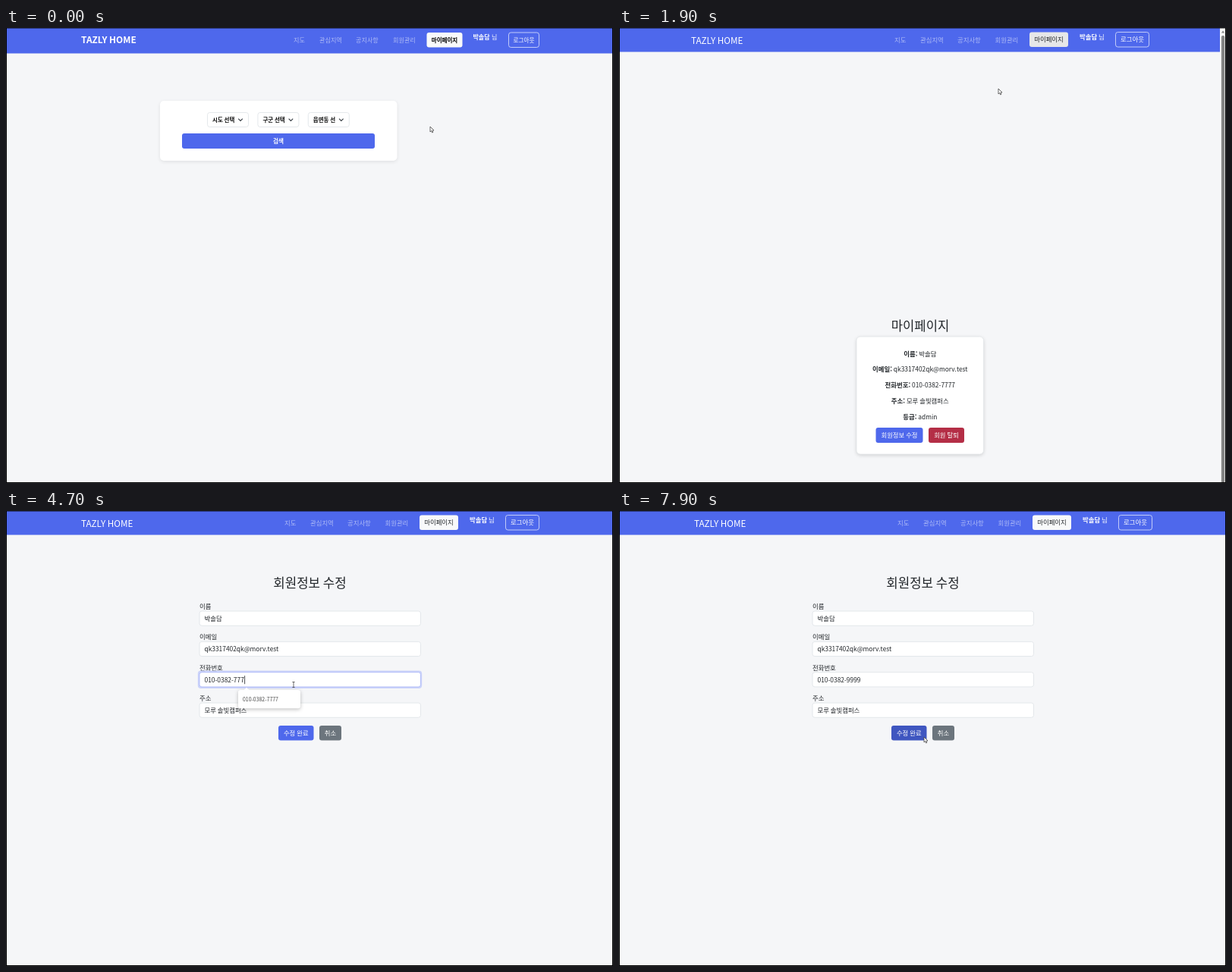
Animation of 800 by 600 pixels, one loop 8 s. Source, as an HTML page with a canvas:

```html
<!DOCTYPE html>
<html lang="ko">
<head>
<meta charset="utf-8">
<style>
  html, body { margin: 0; width: 100%; height: 100%; overflow: hidden; background: #f5f6f8; }
  canvas { display: block; }
</style>
</head>
<body>
<canvas id="stage" width="800" height="600"></canvas>
<script>
const c = document.getElementById('stage').getContext('2d');
const LOOP = 8000;
const FONT = '"Noto Sans CJK KR", "Noto Sans CJK", "Noto Sans", sans-serif';
const BLUE = '#4e68ec', BLUE_HOVER = '#3f56c0', INK = '#212529', PAGE = '#f5f6f8';
const MENU = ['지도', '관심지역', '공지사항', '회원관리'];
const BRAND = 'TAZLY HOME', USER = '박솔담', MAIL = 'qk3317402qk@morv.test';
const AREA = '010-0382-', PHONE = AREA + '7777', PLACE = '모루 솔빛캠퍼스';

// Cursor stops: time, x, y
const PATH = [
  [100, 559, 130], [1200, 573, 19], [1700, 573, 19], [1900, 500, 80],
  [3200, 391, 533], [3400, 391, 533], [4300, 379, 229], [6100, 379, 229],
  [6200, 382, 231], [6900, 402, 298]
];
// Last part of the phone number as it is edited
const KEYS = [
  [4400, '7777'], [4600, '777'], [4900, '77'], [5100, '7'], [5400, ''],
  [6100, '9'], [6400, '99'], [6600, '999'], [6800, '9999']
];

const ramp = (t, a, b) => Math.min(1, Math.max(0, (t - a) / (b - a)));
const ease = p => p * p * (3 - 2 * p);
const mix = (a, b, p) => `rgb(${a.map((v, i) => Math.round(v + (b[i] - v) * p))})`;
const blueMix = p => mix([78, 104, 236], [63, 86, 192], p);

function text(s, x, y, { size = 8.4, weight = 400, color = INK, align = 'left' } = {}) {
  c.font = `${weight} ${size}px ${FONT}`;
  c.fillStyle = color;
  c.textAlign = align;
  c.fillText(s, x, y + size * 0.37);
  return c.measureText(s).width;
}

function box(x, y, w, h, r, fill, stroke, shadow) {
  c.save();
  c.beginPath();
  c.roundRect(x, y, w, h, r);
  if (shadow) {
    c.shadowColor = `rgba(0,0,0,${shadow})`;
    c.shadowBlur = 5;
    c.shadowOffsetY = 1.5;
  }
  if (fill) { c.fillStyle = fill; c.fill(); }
  c.shadowColor = 'transparent';
  if (stroke) { c.strokeStyle = stroke; c.lineWidth = 0.8; c.stroke(); }
  c.restore();
}

function button(label, x, y, w, h, fill, style = {}, stroke) {
  box(x, y, w, h, 3, fill, stroke);
  text(label, x + w / 2, y + h / 2, { color: '#fff', align: 'center', ...style });
}

function poly(points, fill, stroke) {
  c.beginPath();
  points.forEach(([x, y]) => c.lineTo(x, y));
  c.closePath();
  c.fillStyle = fill;
  c.fill();
  if (stroke) { c.strokeStyle = stroke; c.lineWidth = 0.8; c.stroke(); }
}

function header(dx, width, hover) {
  c.fillStyle = BLUE;
  c.fillRect(0, 0, width, 31.5);
  text(BRAND, 95 + dx, 16.5, { size: 11.7, color: '#fff' });
  MENU.forEach((s, i) => text(s, [363, 397, 446, 495.5][i] + dx, 16, { color: 'rgba(255,255,255,.55)' }));
  button('마이페이지', 541 + dx, 5.5, 51, 19.5, mix([248, 249, 250], [211, 212, 213], hover), { color: INK });
  text(USER, 607 + dx, 12, { weight: 700, color: '#fff' });
  text('님', 632 + dx, 12, { color: '#fff' });
  button('로그아웃', 654.5 + dx, 5.5, 44, 19.5, null, {}, '#dfe4fc');
}

function searchPage(t) {
  const black = { size: 7.5, weight: 900 };
  c.fillStyle = BLUE;
  c.fillRect(0, 0, 800, 33.5);
  text(BRAND, 99, 16, { size: 11.9, weight: 700, color: '#fff' });
  MENU.forEach((s, i) => text(s, [379, 413, 461, 510][i], 16.5, { size: 8.1, weight: 500, color: 'rgba(255,255,255,.55)' }));
  button('마이페이지', 554.5, 6, 47, 19.5, mix([248, 249, 250], [211, 212, 213], ramp(t, 1000, 1150)), { ...black, color: '#000' });
  text(USER, 615.5, 12.5, { size: 8, weight: 900, color: '#fff' });
  text('님', 640, 12.5, { size: 8, color: '#fff' });
  button('로그아웃', 662.5, 6, 40, 19.5, null, { size: 7.6, weight: 500 }, '#dfe4fc');

  box(203, 96, 312.5, 79, 5, '#fff', null, 0.09);
  ['시도 선택', '구군 선택', '읍면동 선'].forEach((s, i) => {
    const x = 265.5 + i * 66.4;
    box(x, 111.5, 54, 19, 3, '#fff', '#dee2e6');
    text(s, x + 6.5, 121, { size: 7.5, weight: 700, color: '#111' });
    c.beginPath();
    c.moveTo(x + 40.7, 119.7);
    c.lineTo(x + 43.5, 122.5);
    c.lineTo(x + 46.3, 119.7);
    c.strokeStyle = '#343a40';
    c.lineWidth = 1.1;
    c.stroke();
  });
  button('검색', 232, 139, 254, 20, BLUE, { size: 7.6, weight: 700 });
}

function profilePage(t) {
  header(0, 792, 1 - ramp(t, 1800, 2000));
  text('마이페이지', 397, 393, { size: 16.6, weight: 500, align: 'center' });
  box(313, 407, 167.5, 155, 5, '#fff', '#e3e6e9', 0.16);
  const rows = [['이름:', USER], ['이메일:', MAIL], ['전화번호:', PHONE], ['주소:', PLACE], ['등급:', 'admin']];
  rows.forEach(([key, value], i) => {
    const y = 429.5 + i * 20.8;
    c.font = `700 8.4px ${FONT}`;
    const keyWidth = c.measureText(key + ' ').width;
    c.font = `400 8.4px ${FONT}`;
    const x = 396.8 - (keyWidth + c.measureText(value).width) / 2;
    text(key, x, y, { weight: 700 });
    text(value, x + keyWidth, y);
  });
  button('회원정보 수정', 338.5, 527, 62, 20, blueMix(ramp(t, 3100, 3250)), { weight: 500 });
  button('회원 탈퇴', 408, 527, 47, 20, '#b42e46', { weight: 500 });

  c.fillStyle = '#fafafa';
  c.fillRect(792, 0, 8, 600);
  box(793.8, 10, 4.4, 590, 2, '#858585');
  poly([[793.8, 6.5], [796, 3.5], [798.2, 6.5]], '#858585');
}

function suggestions(list, alpha) {
  const h = 6 + list.length * 18.3;
  c.save();
  c.globalAlpha = alpha;
  // The panel shrinks slightly while it fades out
  const scale = 0.94 + 0.06 * alpha;
  c.translate(347, 236);
  c.scale(scale, scale);
  c.translate(-347, -236);
  box(306, 236, 82, h, 3, '#fff', null, 0.25);
  poly([[313.5, 236.2], [317, 232.8], [320.5, 236.2]], '#fff');
  list.forEach((s, i) => text(s, 312, 248 + i * 18.5, { size: 6.9, color: '#444' }));
  c.restore();
}

function editPage(t) {
  header(4, 800, 0);
  text('회원정보 수정', 400.5, 94.5, { size: 16.8, weight: 500, align: 'center' });
  const [keyTime, tail] = KEYS.filter(k => k[0] <= t).pop() || [0, '7777'];
  const focused = t >= 4400 && t < 7700;
  const fields = [['이름', USER], ['이메일', MAIL], ['전화번호', AREA + tail], ['주소', PLACE]];
  fields.forEach(([label, value], i) => {
    const y = 132 + i * 40.35, active = focused && i === 2;
    text(label, 255, y - 6);
    if (active) box(252.8, y - 2.2, 295.4, 23.6, 4, '#cbd3fa');
    box(255, y, 291.5, 19.2, 3, '#fff', active ? '#a7b4f6' : '#dee2e6');
    const w = text(value, 261.5, y + 10);
    if (active && (t - keyTime) % 1000 < 500) {
      c.fillStyle = INK;
      c.fillRect(262 + w, y + 4.5, 0.8, 11);
    }
  });
  button('수정 완료', 359, 283, 46.5, 19.5, blueMix(ramp(t, 6800, 6950)), { weight: 500 });
  button('취소', 413, 283, 29, 19.5, '#6c757d', { weight: 500 });
  if (t >= 4500 && t < 6300) {
    const list = t < 5100 ? [PHONE] : [AREA + '7387', PHONE];
    suggestions(list, ramp(t, 4500, 4600) * (1 - ramp(t, 6100, 6300)));
  }
}

function cursor(t) {
  const i = PATH.findIndex(p => p[0] > t);
  let [, x, y] = PATH[i < 0 ? PATH.length - 1 : Math.max(0, i - 1)];
  if (i > 0) {
    const [a, b] = [PATH[i - 1], PATH[i]], p = ease(ramp(t, a[0], b[0]));
    x += (b[1] - a[1]) * p;
    y += (b[2] - a[2]) * p;
  }
  c.save();
  c.translate(x, y);
  if ((t > 1000 && t < 1700) || (t > 3100 && t < 3400)) {
    poly([[1.2, 0], [2.4, 0.6], [2.4, 3.2], [5.6, 4.2], [5.4, 7.2], [4.6, 9], [1.6, 9], [-0.8, 5.6], [0.2, 5], [1, 5.8]], '#fff', '#222');
  } else if (t > 4200 && t < 6450) {
    c.strokeStyle = '#444';
    c.lineWidth = 0.8;
    c.beginPath();
    for (const s of [-3.5, 3.5]) { c.moveTo(-1.6, s); c.lineTo(1.6, s); }
    c.moveTo(0, -3.5);
    c.lineTo(0, 3.5);
    c.stroke();
  } else {
    poly([[0, 0], [0, 7], [1.6, 5.6], [2.7, 8], [3.8, 7.5], [2.8, 5.2], [5, 5]], '#fff', '#444');
  }
  c.restore();
}

function draw(now) {
  const t = now % LOOP;
  c.fillStyle = PAGE;
  c.fillRect(0, 0, 800, 600);
  (t < 1700 ? searchPage : t < 3400 ? profilePage : editPage)(t);
  cursor(t);
  c.fillStyle = '#000';
  c.fillRect(0, 0, 1, 600);
  c.fillRect(799, 0, 1, 600);
  c.fillRect(0, 599, 800, 1);
  c.fillStyle = 'rgba(0,0,0,.45)';
  c.fillRect(0, 0, 800, 1);
}

const start = performance.now();
function tick() {
  draw(performance.now() - start);
  requestAnimationFrame(tick);
}
tick();
</script>
</body>
</html>
```
